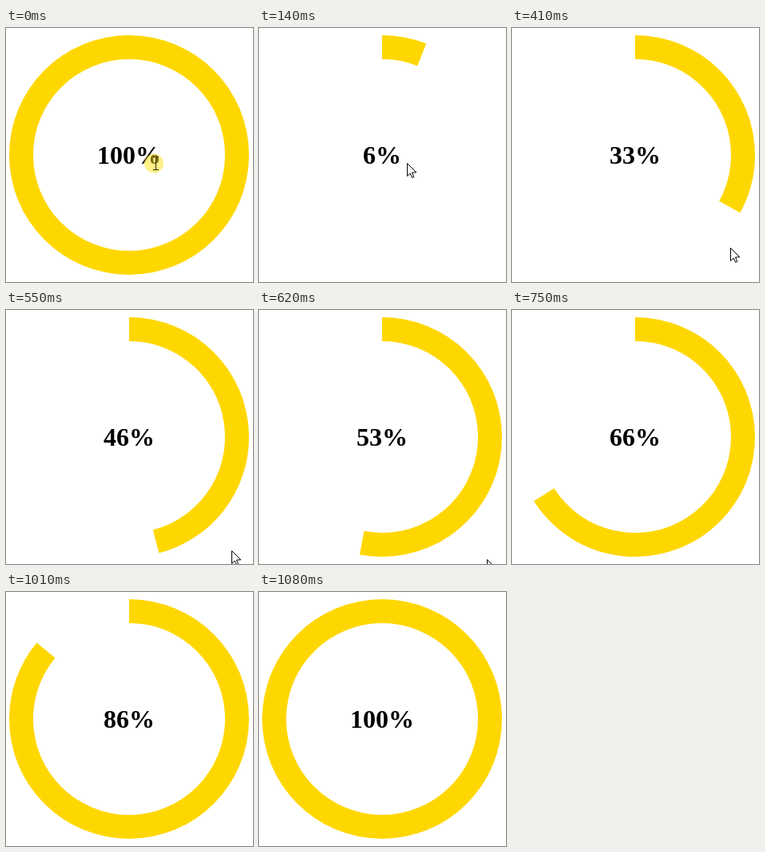
Write an HTML page with a canvas that moves like this. It is 309 by 318 pixels and loops after 1.21 s.

```html
<!DOCTYPE html>
<html lang="en">
<head>
<meta charset="utf-8">
<title>Progress ring</title>
<style>
  html, body { margin: 0; width: 100%; height: 100%; overflow: hidden; background: #fff; }
  canvas { display: block; }
</style>
</head>
<body>
<canvas id="stage" width="309" height="318"></canvas>
<script>
const ctx = document.getElementById('stage').getContext('2d');
const LOOP = 1210;
const CX = 154, CY = 159, OUTER = 150, INNER = 120;

// Start time of each tick; the last tick is a full ring.
const ticks = [70, 140, 210, 280, 340, 410, 480, 550, 620, 680, 750, 820, 880, 950, 1020, 1080];

// Pointer tip per tick until it leaves the stage.
const pointer = [[185, 169], [185, 169], [195, 182], [223, 215], [255, 253],
                 [273, 275], [278, 288], [282, 301], [285, 312]];

function drawRing(percent) {
  if (percent <= 0) return;
  const start = -Math.PI / 2;
  const end = start + percent / 100 * 2 * Math.PI;
  ctx.fillStyle = '#ffd700';
  ctx.beginPath();
  ctx.arc(CX, CY, OUTER, start, end);
  ctx.arc(CX, CY, INNER, end, start, true);
  ctx.closePath();
  ctx.fill();
}

function drawLabel(percent) {
  ctx.fillStyle = '#000';
  ctx.font = 'bold 32px "Liberation Serif", "Times New Roman", serif';
  ctx.textAlign = 'center';
  ctx.fillText(percent + '%', CX, 170);
}

function drawArrow([x, y]) {
  ctx.save();
  ctx.translate(x + 0.5, y + 0.5);
  ctx.beginPath();
  ctx.moveTo(0, 0);
  ctx.lineTo(0, 16);
  ctx.lineTo(3.7, 12.5);
  ctx.lineTo(6.2, 18);
  ctx.lineTo(8.3, 17);
  ctx.lineTo(6, 11.5);
  ctx.lineTo(11.3, 11.3);
  ctx.closePath();
  ctx.fillStyle = '#fff';
  ctx.fill();
  ctx.strokeStyle = '#000';
  ctx.lineWidth = 1;
  ctx.stroke();
  ctx.restore();
}

function drawTextCursor() {
  ctx.fillStyle = 'rgba(255, 225, 20, 0.5)';
  ctx.beginPath();
  ctx.arc(185, 169.5, 12, 0, 2 * Math.PI);
  ctx.fill();
  ctx.fillStyle = '#3a2c00';
  ctx.fillRect(187, 162, 1, 16);
  for (const y of [161, 177]) {
    ctx.fillRect(184, y, 3, 1);
    ctx.fillRect(188, y, 3, 1);
  }
}

function render(t) {
  const step = ticks.filter(start => start <= t).length - 1;
  const last = ticks.length - 1;
  const percent = step < 0 ? 100 : Math.floor(step * 100 / last);
  ctx.fillStyle = '#fff';
  ctx.fillRect(0, 0, 309, 318);
  drawRing(percent);
  drawLabel(percent);
  if (step < 0) drawTextCursor();
  else if (pointer[step]) drawArrow(pointer[step]);
}

const origin = performance.now();
function loop() {
  render((performance.now() - origin) % LOOP);
  requestAnimationFrame(loop);
}
loop();
</script>
</body>
</html>
```
